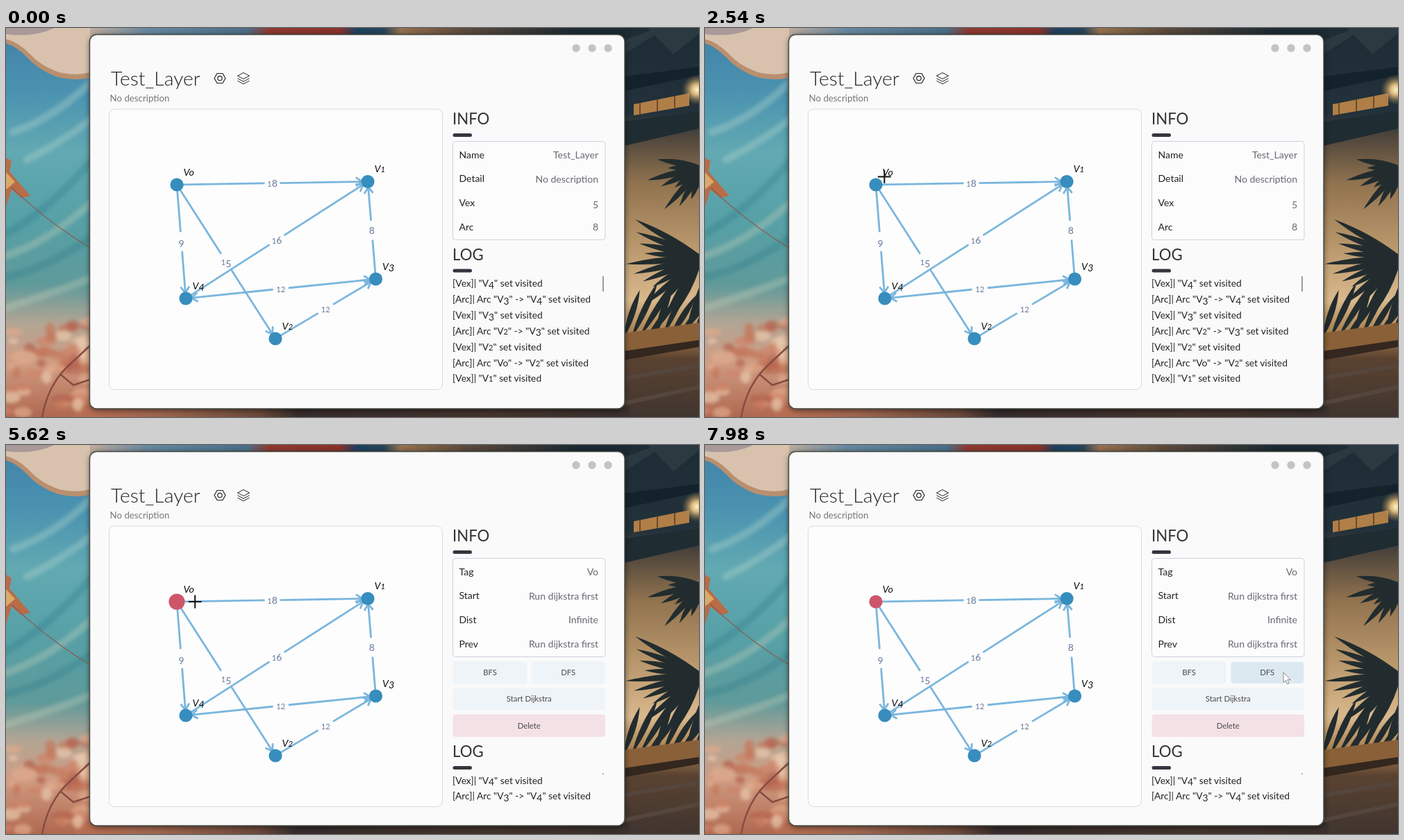
Animation of 998x561 px, one loop 8000 ms. Source, as an HTML page:

```html
<!DOCTYPE html>
<html lang="en">
<head>
<meta charset="utf-8">
<title>Graph layer</title>
<style>
html, body { margin: 0; width: 100%; height: 100%; overflow: hidden; background: #fafafb; }
svg { display: block; width: 100vw; height: 100vh; }
text { font-family: Lato, "Open Sans", sans-serif; white-space: pre; }
</style>
</head>
<body>
<svg id="stage" viewBox="0 0 998 561" preserveAspectRatio="none">
  <defs>
    <linearGradient id="sky" x1="0" y1="0" x2="0" y2="1">
      <stop offset="0" stop-color="#4181a8"/><stop offset=".16" stop-color="#4a92b0"/>
      <stop offset=".32" stop-color="#62a9b2"/><stop offset=".5" stop-color="#56a0a6"/>
      <stop offset=".66" stop-color="#5f9a9a"/><stop offset=".76" stop-color="#b3a594"/>
      <stop offset=".86" stop-color="#cf9c83"/><stop offset="1" stop-color="#b0684f"/>
    </linearGradient>
    <linearGradient id="dusk" x1="0" y1="0" x2="0" y2="1">
      <stop offset="0" stop-color="#1d2c35"/><stop offset=".22" stop-color="#22313a"/>
      <stop offset=".28" stop-color="#4f463c"/><stop offset=".4" stop-color="#91734f"/>
      <stop offset=".56" stop-color="#b9976c"/><stop offset=".7" stop-color="#d9b88c"/>
      <stop offset=".78" stop-color="#a9814f"/><stop offset=".85" stop-color="#5a4231"/>
      <stop offset="1" stop-color="#40352f"/>
    </linearGradient>
    <linearGradient id="top">
      <stop offset="0" stop-color="#c9b09c"/><stop offset=".12" stop-color="#6688a0"/>
      <stop offset=".3" stop-color="#4b6f88"/><stop offset=".34" stop-color="#8f3a31"/>
      <stop offset=".47" stop-color="#8a322b"/><stop offset=".5" stop-color="#1d4262"/>
      <stop offset=".55" stop-color="#28455a"/><stop offset=".58" stop-color="#96714f"/>
      <stop offset=".7" stop-color="#5c4a3d"/><stop offset=".9" stop-color="#1c2a33"/>
    </linearGradient>
    <linearGradient id="low">
      <stop offset="0" stop-color="#b96e52"/><stop offset=".15" stop-color="#a0674f"/>
      <stop offset=".33" stop-color="#6d4a3c"/><stop offset=".4" stop-color="#362c2b"/>
      <stop offset=".75" stop-color="#45342d"/><stop offset="1" stop-color="#3a302c"/>
    </linearGradient>
    <radialGradient id="lamp">
      <stop offset="0" stop-color="#fff3c6"/><stop offset=".35" stop-color="#d9b67a"/>
      <stop offset="1" stop-color="#8b6b3f" stop-opacity="0"/>
    </radialGradient>
    <filter id="shade" x="-5%" y="-5%" width="110%" height="110%"><feGaussianBlur stdDeviation="4"/></filter>
    <filter id="soft"><feGaussianBlur stdDeviation="2.500"/></filter>
    <clipPath id="logClip"><rect x="640" y="300" width="216" height="217"/></clipPath>
    <clipPath id="btnClip"><rect id="btnHole" x="640" y="307" width="228" height="0"/></clipPath>
  </defs>

  <g id="art">
    <rect width="500" height="561" fill="url(#sky)"/>
    <rect x="500" width="498" height="561" fill="url(#dusk)"/>
    <rect x="110" width="790" height="14" fill="url(#top)"/>
    <rect x="100" y="545" width="798" height="16" fill="url(#low)"/>
    <path d="M0 0H121V72Q98 77 72 70Q46 60 30 42Q14 26 0 22Z" fill="#b98f6e"/>
    <path d="M0 0H121V64Q98 70 74 63Q49 54 34 37Q17 20 0 16Z" fill="#d8c2ae"/>
    <path d="M0 0H70Q40 14 0 9Z" fill="#a99a99"/>
    <g fill="none" stroke-linecap="round" stroke-width="11" opacity=".35" filter="url(#soft)">
      <path d="M10 150Q70 130 125 75M30 190Q80 165 125 130" stroke="#b5d6cd"/>
      <path d="M-5 300Q60 265 125 190M-5 360Q55 350 125 300" stroke="#2f7d8c"/>
      <path d="M-5 330Q60 310 125 250M-5 405Q60 385 125 360" stroke="#c2cfba"/>
    </g>
    <path d="M0 187L8 192L5 207L35 242L22 245L8 233L0 258Z" fill="#b96c48"/>
    <path d="M0 208L13 222L0 233Z" fill="#dba968"/>
    <path d="M8 230Q60 280 121 317" fill="none" stroke="#8a5a50" stroke-width="1.2"/>
    <g id="leaves" filter="url(#soft)"></g>
    <path d="M52 561Q60 515 90 487L121 458M79 500L97 515L121 507" fill="none" stroke="#874d42" stroke-width="2.500"/>
    <path d="M890 18L937 0H950L890 38ZM924 0H998V8L961 38Z" fill="#2b3940"/>
    <path d="M890 70L998 56V68L890 91Z" fill="#14222b"/>
    <path d="M904 110L984 94V112L904 126Z" fill="#b07f48"/>
    <path d="M913 108V124M938 103V120M963 98V115" stroke="#6f4a2b" stroke-width="2"/>
    <circle cx="995" cy="89" r="22" fill="url(#lamp)"/>
    <path d="M890 135L998 120V145L890 170Z" fill="#1f2c32"/>
    <g id="palm" fill="#222c2e"></g>
    <path d="M890 440L998 425V450L890 466Z" fill="#8a6038"/>
    <path d="M890 466L998 450V460L890 479Z" fill="#33271f"/>
    <path d="M890 505L998 487M890 541L998 518" stroke="#54463c" stroke-width="6"/>
  </g>

  <rect x="121" y="11" width="770" height="540" rx="11" fill="#000" opacity=".6" filter="url(#shade)"/>
  <rect x="120.500" y="9.500" width="770.500" height="539.500" rx="10" fill="#fafafb" stroke="#484c45" stroke-width="1.5"/>
  <g fill="#c3c3c4"><circle cx="821" cy="29" r="5.7"/><circle cx="844" cy="29" r="5.7"/><circle cx="867" cy="29" r="5.7"/></g>
  <g fill="none" stroke="#222" stroke-width="1.2" stroke-linejoin="round">
    <path d="M300 72.5L304 65.5H312L316 72.5L312 79.5H304Z"/><circle cx="308" cy="72.5" r="3.2"/>
    <path d="M333.500 69L342 64.500L350.500 69L342 73.500ZM333.500 72.700L342 77.200L350.500 72.700M333.500 76.200L342 80.700L350.500 76.200" stroke-width="1"/>
  </g>
  <rect x="148.500" y="117" width="480" height="404.500" rx="8" fill="#fdfdfd" stroke="#d9d9e2"/>
  <rect x="643.500" y="163.500" width="219.500" height="142" rx="4" fill="#fcfcfd" stroke="#d0d0dc"/>
  <g id="ui"></g>
  <g id="rows"></g>
  <g id="layerInfo"></g>
  <g id="vexInfo"></g>
  <g id="buttons" clip-path="url(#btnClip)"></g>
  <g clip-path="url(#logClip)"><g id="log"></g></g>
  <rect id="thumb" x="859" y="358" width="1.800" height="22" fill="#929296"/>
  <g id="graph"></g>
  <path id="cross" d="M-9.500 0H9.500M0 -9.500V9.500" stroke="#111" stroke-width="2"/>
  <path id="arrow" d="M0 0V14.500L3.400 11.400L5.700 16.800L8 15.800L5.700 10.600H10.200Z" fill="#fff" stroke="#888" stroke-width="1"/>
</svg>
<script>
const LOOP = 8000, SVG = 'http://www.w3.org/2000/svg';
const $ = id => document.getElementById(id);

function el(parent, tag, attrs) {
  const e = document.createElementNS(SVG, tag);
  set(e, attrs);
  parent.appendChild(e);
  return e;
}
function set(e, attrs) {
  for (const k in attrs) e.setAttribute(k, attrs[k]);
}

// Text with old-style figures: 1 and 2 are low, 3 4 5 7 9 hang below the line.
function label(parent, x, y, size, str, attrs = {}) {
  const t = el(parent, 'text', { x, y, 'font-size': size, fill: '#222', ...attrs });
  let shift = 0;
  for (const part of str.match(/\d|\D+/g)) {
    const want = /[34579]/.test(part) ? size * 0.2 : 0;
    const s = el(t, 'tspan', { dy: want - shift });
    if (/[12]/.test(part)) s.setAttribute('font-size', size * 0.8);
    s.textContent = part;
    shift = want;
  }
  return t;
}

// Scenery
let seed = 7;
const rnd = () => (seed = (seed * 16807) % 2147483647) / 2147483647;
const reds = ['#cf8266', '#e0ab8c', '#b3614d', '#e8c9ad', '#c47659'];
for (let i = 0; i < 60; i++) {
  const x = rnd() * 128, y = 440 + rnd() * 122 - x * 0.15;
  el($('leaves'), 'ellipse', { cx: x, cy: y, rx: 6 + rnd() * 12, ry: 4 + rnd() * 6, fill: reds[i % 5], opacity: 0.7 });
}
function frond(x, y, a, len) {
  const c = Math.cos(a), s = Math.sin(a), w = 9;
  const mx = x + c * len * 0.5, my = y + s * len * 0.5;
  el($('palm'), 'path', { d: `M${x} ${y}Q${mx - s * w} ${my + c * w} ${x + c * len} ${y + s * len}Q${mx + s * w} ${my - c * w} ${x} ${y}` });
}
for (let i = 0; i < 8; i++) frond(1003, 200, 1.9 + i * 0.2, 50 + (i % 3) * 16);
for (let i = 0; i < 12; i++) frond(1003, 330, 2 + i * 0.15, 84 + (i % 4) * 9);
for (let i = 0; i < 11; i++) frond(890 + i * 11, 446, -1.25 + (i % 4) * 0.12, 72 + (i % 3) * 16);

// Fixed texts
const ui = $('ui');
label(ui, 151, 83, 28.4, 'Test_Layer', { 'font-weight': 300 });
label(ui, 149.5, 106, 13.3, 'No description', { fill: '#777' });
const heading = { fill: '#333' };
label(ui, 643, 139, 22.2, 'INFO', heading);
const bar = { x: 643.5, width: 27.5, height: 5, rx: 2.5, fill: '#39343f' };
el(ui, 'rect', { ...bar, y: 152 });

const rowY = [183, 217.7, 252.4, 287.2];
const rows = rowY.map(y => el($('rows'), 'rect', { x: 644, y: y - 17, width: 218.5, height: 34, rx: 3, fill: '#ececf1' }));
function info(id, pairs) {
  pairs.forEach(([k, v], i) => {
    label($(id), 652.5, rowY[i] + 4.6, 14, k);
    label($(id), 853, rowY[i] + 5, 14, v, { 'text-anchor': 'end', fill: '#686870' });
  });
}
info('layerInfo', [['Name', 'Test_Layer'], ['Detail', 'No description'], ['Vex', '5'], ['Arc', '8']]);
info('vexInfo', [['Tag', 'Vo'], ['Start', 'Run dijkstra first'], ['Dist', 'Infinite'], ['Prev', 'Run dijkstra first']]);

const BLUE = [[239, 244, 248], [220, 233, 241]], PINK = [[243, 225, 230], [238, 208, 217]];
const buttons = [
  ['BFS', 643.5, 312, 107, BLUE], ['DFS', 756.5, 312, 106.5, BLUE],
  ['Start Dijkstra', 643.5, 350, 219.5, BLUE], ['Delete', 643.5, 388.5, 219.5, PINK]
].map(([name, x, y, w, tint]) => {
  const rect = el($('buttons'), 'rect', { rx: 4 });
  label($('buttons'), x + w / 2, y + 20.3, 11.3, name, { 'text-anchor': 'middle', fill: '#4a4a4a' });
  return { x, y, w, h: 32.5, tint, rect };
});

const log = $('log');
label(log, 643, 334.5, 22.2, 'LOG', heading);
el(log, 'rect', { ...bar, y: 347.5 });
['[Vex]| "V4"', '[Arc]| Arc "V3" -> "V4"', '[Vex]| "V3"', '[Arc]| Arc "V2" -> "V3"',
 '[Vex]| "V2"', '[Arc]| Arc "Vo" -> "V2"', '[Vex]| "V1"'
].forEach((s, i) => label(log, 643, 373 + i * 22.9, 13.8, s + ' set visited'));

// Graph
const graph = $('graph');
const nodes = [[246, 226], [521, 221.5], [388, 448], [532.5, 362], [259, 390]];
const arcs = [[0, 1, '18'], [0, 4, '9'], [0, 2, '15'], [4, 1, '16'], [3, 1, '8'], [2, 3, '12'], [4, 3, '12', true]];
const pen = { fill: 'none', stroke: '#7ab6dd', 'stroke-width': 2.8, 'stroke-linecap': 'round', 'stroke-linejoin': 'round' };

function head([x, y], a) {
  const at = (d, r) => `${x - d * Math.cos(a + r)} ${y - d * Math.sin(a + r)}`;
  el(graph, 'path', { ...pen, d: `M${at(17, 0.34)}L${at(8, 0)}L${at(17, -0.34)}` });
}
for (const [i, j, cost, both] of arcs) {
  const [p, q] = [nodes[i], nodes[j]];
  const dx = q[0] - p[0], dy = q[1] - p[1], len = Math.hypot(dx, dy), a = Math.atan2(dy, dx);
  const at = d => `${p[0] + dx * d / len} ${p[1] + dy * d / len}`;
  const gap = 12 + 3 * Math.abs(Math.sin(a));
  el(graph, 'path', { ...pen, d: `M${at(9)}L${at(len / 2 - gap)}M${at(len / 2 + gap)}L${at(len - 9)}` });
  head(q, a);
  if (both) head(p, a + Math.PI);
  label(graph, (p[0] + q[0]) / 2, (p[1] + q[1]) / 2 + 5, 14, cost, { 'text-anchor': 'middle', fill: '#667a9c' });
}
const dots = nodes.map(([cx, cy]) => el(graph, 'circle', { cx, cy, r: 9.6, fill: '#378dbd' }));
nodes.forEach(([x, y], i) => label(graph, x + 9.5, y - 13.5, 14.3, 'V' + (i || 'o'), { 'font-style': 'italic', fill: '#111' }));

// Motion: [time, values...]
const path = [
  [0, 1012, 335], [400, 1012, 335], [1140, 812, 290], [1240, 800, 286], [1660, 460, 171], [1980, 325, 180],
  [2400, 270, 205], [2820, 245, 228], [5440, 245, 228], [5620, 272, 226], [6180, 520, 232],
  [6280, 566, 243], [6700, 714, 297], [7020, 702, 400], [7240, 692, 436], [7440, 692, 420],
  [7660, 708, 338], [7820, 795, 331], [7960, 833, 328], [8000, 833, 328]
];
const size = [[0, 9.6], [3800, 9.6], [4050, 11.6], [4560, 11.6], [4720, 8.1], [4760, 8.1], [4960, 11.6], [6280, 11.6], [6460, 9.6], [8000, 9.6]];
const picked = [[0, 0], [4080, 0], [4280, 1], [8000, 1]];
const opened = [[0, 0], [4120, 0], [4440, 1], [8000, 1]];

function segment(keys, t) {
  let i = 0;
  while (i < keys.length - 2 && t >= keys[i + 1][0]) i++;
  return i;
}
function ease(keys, t) {
  const i = segment(keys, t), [a, b] = [keys[i], keys[i + 1]];
  const u = Math.min(1, Math.max(0, (t - a[0]) / (b[0] - a[0])));
  return a[1] + (b[1] - a[1]) * u * u * (3 - 2 * u);
}
// Cubic path that rests where two keys are equal.
function slope(i, k) {
  const a = path[i - 1], b = path[i], c = path[i + 1];
  if (!a || !c || (b[1] === a[1] && b[2] === a[2]) || (b[1] === c[1] && b[2] === c[2])) return 0;
  const l = (b[k] - a[k]) / (b[0] - a[0]), r = (c[k] - b[k]) / (c[0] - b[0]);
  return l * r <= 0 ? 0 : 2 * l * r / (l + r);
}
function pointer(t) {
  const i = segment(path, t), a = path[i], b = path[i + 1], d = b[0] - a[0], u = (t - a[0]) / d;
  return [1, 2].map(k =>
    a[k] * (1 + 2 * u) * (1 - u) ** 2 + slope(i, k) * d * u * (1 - u) ** 2 +
    b[k] * u * u * (3 - 2 * u) + slope(i + 1, k) * d * u * u * (u - 1));
}
const inside = ([px, py], x, y, w, h) => px >= x && px < x + w && py >= y && py < y + h;
const mix = (a, b, u) => `rgb(${a.map((v, i) => Math.round(v + (b[i] - v) * u))})`;

function draw(t) {
  const p = pointer(t), trail = [];
  for (let i = 0; i < 10; i++) trail.push(pointer(Math.max(0, t - i * 20)));
  const hover = (...box) => trail.filter(q => inside(q, ...box)).length / trail.length;

  const over = inside(p, 148, 117, 480, 405);
  for (const id of ['cross', 'arrow']) {
    $(id).style.display = over === (id === 'cross') ? '' : 'none';
    $(id).setAttribute('transform', `translate(${p})`);
  }

  set(dots[0], { r: ease(size, t), fill: mix([55, 141, 189], [206, 86, 107], ease(picked, t)) });
  rows.forEach((r, i) => r.setAttribute('opacity', 0.65 * hover(644, rowY[i] - 17.4, 218, 34.8)));

  const open = ease(opened, t);
  $('layerInfo').style.display = t < 4120 ? '' : 'none';
  $('vexInfo').style.display = t < 4120 ? 'none' : '';
  $('btnHole').setAttribute('height', 116 * open);
  $('buttons').setAttribute('opacity', open);
  log.setAttribute('transform', `translate(0 ${115.5 * open})`);
  set($('thumb'), { y: 358 + 115.5 * open, height: 22 - 20.5 * open });

  for (const b of buttons) {
    const h = open ? hover(b.x, b.y, b.w, b.h) : 0, s = h * 0.8;
    set(b.rect, { x: b.x + s, y: b.y + s, width: b.w - 2 * s, height: b.h - 2 * s, fill: mix(...b.tint, h) });
  }
}

const start = performance.now();
function tick() {
  draw((performance.now() - start) % LOOP);
  requestAnimationFrame(tick);
}
tick();
</script>
</body>
</html>
```
